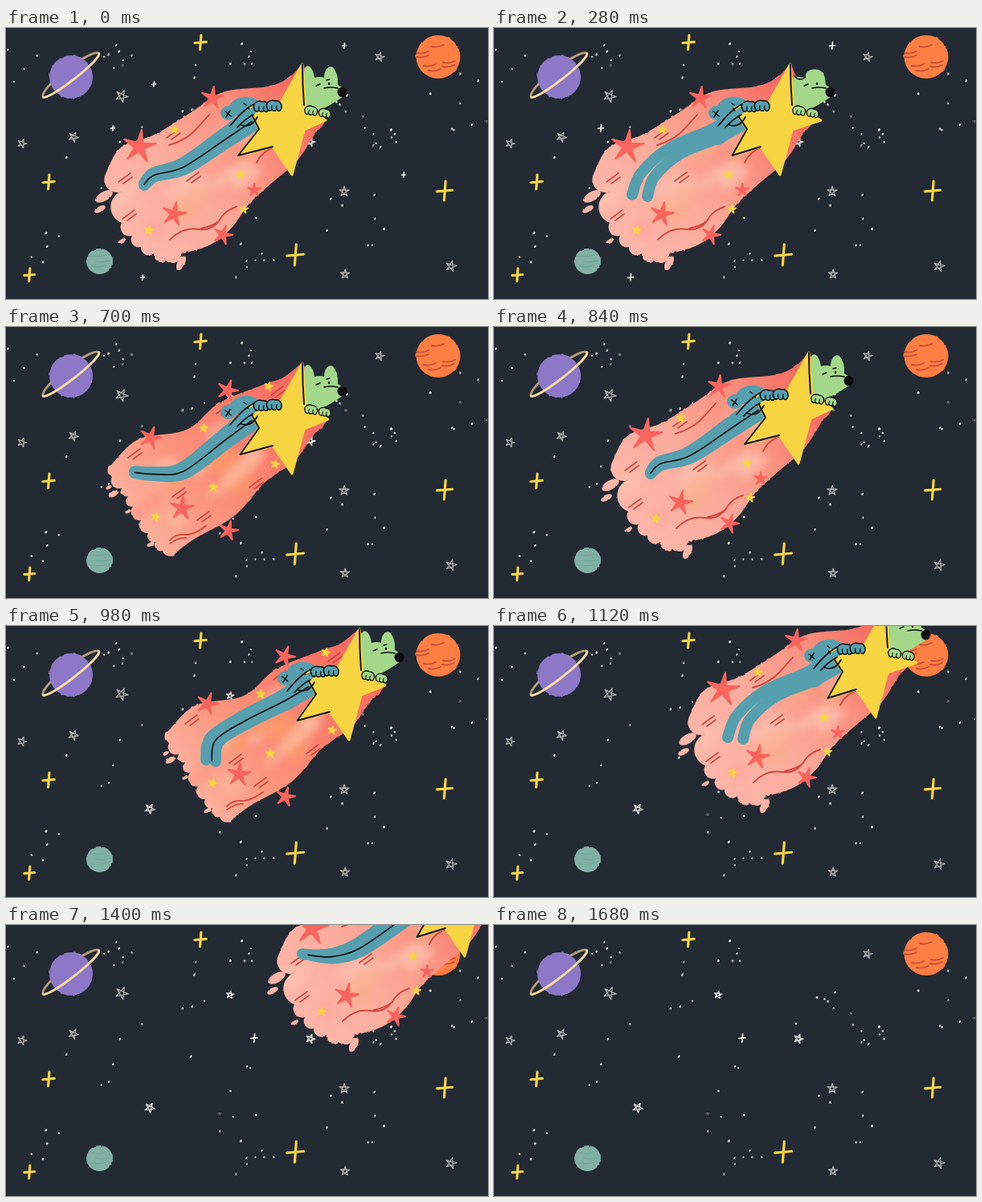
Animation, 600 px wide and 338 px high, one loop 1960 ms. Source, as an HTML page:

```html
<!DOCTYPE html>
<html lang="en">
<head>
<meta charset="utf-8">
<title>Star ride</title>
<style>
html, body { margin: 0; width: 100%; height: 100%; overflow: hidden; background: #232a33; }
svg { display: block; width: 100%; height: 100%; }
</style>
</head>
<body>
<svg id="stage" viewBox="0 0 600 338"></svg>
<script>
const BEAT = 140, LOOP = 1960, LAUNCH = 5, EMPTY = 12;
const INK = '#0d0d10', BLUE = '#569fae', GREEN = '#a3d88b', YELLOW = '#f6d442',
  CORAL = '#f9645e', DARK = '#d4473f', WHITE = '#f6f3ec', GRAY = '#b5b1ad';

const path = (d, attrs) => `<path d="${d}" ${attrs}/>`;
const line = (d, color = INK, width = 1.6) =>
  path(d, `fill="none" stroke="${color}" stroke-width="${width}" stroke-linecap="round" stroke-linejoin="round"`);
const ellipse = (x, y, rx, ry, fill, turn = 0, opacity = 1) =>
  `<ellipse cx="${x}" cy="${y}" rx="${rx}" ry="${ry}" fill="${fill}" opacity="${opacity}" transform="rotate(${turn} ${x} ${y})"/>`;
const rough = content => `<g filter="url(#rough)">${content}</g>`;
const points = text => text.split(' ').map(p => p.split(',').map(Number));
const each = (text, draw) => points(text).map(p => draw(...p)).join('');
const repeat = (n, draw) => Array.from({ length: n }, (_, i) => draw(i)).join('');
const wave = (pose, peak) => Math.cos((pose - peak) * Math.PI / 3);
const mix = (a, b, t) => a + (b - a) * t;

let seed = 11;
function random(low, high) {
  seed = (seed * 16807) % 2147483647;
  return mix(low, high, seed / 2147483647);
}

// Catmull-Rom spline, without its leading move
function curve(p) {
  const at = i => p[Math.max(0, Math.min(p.length - 1, i))];
  return p.slice(1).map((end, i) => {
    const from = at(i), before = at(i - 1), after = at(i + 2);
    const c1 = from.map((v, k) => v + (end[k] - before[k]) / 6);
    const c2 = end.map((v, k) => v - (after[k] - from[k]) / 6);
    return `C${c1} ${c2} ${end}`;
  }).join('');
}

function polar(x, y, r, degrees) {
  const a = degrees * Math.PI / 180;
  return [x + r * Math.sin(a), y - r * Math.cos(a)];
}
function solidStar(x, y, r, color) {
  const d = repeat(10, i => (i ? 'L' : 'M') + polar(x, y, i % 2 ? r * .28 : r, i * 36 + y % 20));
  return path(d + 'Z', `fill="${color}" stroke="${color}" stroke-width="2.2" stroke-linejoin="round"`);
}
const scribbleStar = (x, y, r, color) =>
  line(repeat(5, i => (i ? 'L' : 'M') + polar(x, y, r, i * 144 + x % 30)) + 'Z', color, 1.2);
const cross = (x, y, r, color, width) =>
  line(`M${x + r * .1},${y - r}L${x - r * .05},${y + r}M${x - r * .8},${y + r * .08}L${x + r * .8},${y - r * .06}`, color, width);
const dot = (x, y) => ellipse(x, y, random(.9, 1.4), random(.9, 1.8), WHITE, 25);

// Clusters: centre, spread and number of dots
const CLUSTERS = '142,38,20,8 290,35,16,6 464,130,22,10 400,105,30,6 300,290,34,9 55,272,24,5 ' +
  '270,180,60,7 430,248,42,8 565,95,38,8 20,45,24,4 225,75,30,5 120,165,55,6';

function sky() {
  const ring = (sweep, depth, color) =>
    `<g transform="rotate(-38 81 59)">${line(`M37,59A44,${depth} 0 0 ${sweep} 125,59`, color, 3)}</g>`;
  return each(CLUSTERS, (x, y, spread, n) =>
      repeat(n, () => dot(x + random(-spread, spread), y + random(-spread, spread)))) +
    each('144,85,8 20,144,6 84,136,6.5 465,36,6 421,204,6.5 422,307,6 554,297,7', (x, y, r) => scribbleStar(x, y, r, GRAY)) +
    each('279,87,5 379,142,6 179,228,6.5', (x, y, r) => scribbleStar(x, y, r, WHITE)) +
    cross(309, 141, 5, WHITE, 1.8) +
    each('242,18,9 53,192,9 29,308,8 360,283,13 546,203,12', (x, y, r) => cross(x, y, r, YELLOW, 3.2)) +
    ring(1, 9, '#b39c7c') +
    rough(ellipse(81, 61, 27, 27, '#8c78c6') + ellipse(538, 36, 27.5, 27, '#ff7e43') + ellipse(116.5, 291, 16.5, 16, '#82b0a4')) +
    each('511,31 511,36 530,23 520,47 544,43 543,48 526,53', (x, y) => line(`M${x},${y}q7,2 15,-2`, '#c4503a', 1.9)) +
    each('107,284 111,291 106,297', (x, y) => line(`M${x},${y}q10,2 19,-1`, '#6ea597', 1.2)) +
    ring(0, 6, '#f5d9a4');
}

// Smooth flanks joined by a tail of round lobes
function plume(upper, tail, lower) {
  const [a, t, b] = [upper, tail, lower].map(points);
  let last = a[a.length - 1];
  const lobes = t.map(p => {
    const r = Math.hypot(p[0] - last[0], p[1] - last[1]) * .54;
    last = p;
    return `A${r},${r} 0 0 0 ${p}`;
  }).join('');
  return `M${a[0]}${curve(a)}${lobes}${curve([last, ...b])}Z`;
}

function trail(id, { shape, drops, tints, waves, dashes, reds, yellows }) {
  const washes = repeat(16, i => {
    const t = random(0, 1), side = random(-32, 32);
    return ellipse(mix(160, 315, t) + side * .6, mix(235, 140, t) + side, random(12, 30), random(8, 16),
      tints[i % tints.length], -38, .5);
  });
  return `<g id="trail${id}"><clipPath id="clip${id}">${path(shape, '')}</clipPath>` +
    rough(path(shape, `fill="url(#heat${id})"`) + each(drops, (x, y, r, turn) => ellipse(x, y, r, r * .48, '#fbb5a8', turn))) +
    `<g clip-path="url(#clip${id})"><g filter="url(#soft)">${washes}</g></g>` +
    line(waves, DARK, 1.9) +
    each(dashes, (x, y) => line(`M${x},${y}l15,-11m-9,13l11,-8`, DARK, 1.7)) +
    each(reds, (x, y, r) => solidStar(x, y, r, CORAL)) +
    each(yellows, (x, y) => solidStar(x, y, 5, YELLOW)) + '</g>';
}

const TRAILS = [
  {
    shape: plume('369,44 352,62 325,73 270,80 229,106 185,133 143,149 124,182',
      '143,204 144,243 157,259 168,273 184,281 199,290 218,282',
      '255,270 282,248 302,220 330,194 362,166 384,133 397,112 380,70'),
    drops: '122,210,12,-30 117,226,7.5,-28 144,266,5,-30 218,293,10,115',
    tints: ['#fdc6b4', '#f9ae88', '#fca69e'],
    waves: 'M203,146Q224,140 236,127T253,108M204,264Q220,248 239,251T268,236Q276,226 287,223M243,250Q258,247 266,240M312,168Q320,150 345,146',
    dashes: '140,192 225,191 145,238 200,137',
    reds: '166,148,21 257,87,14 209,232,15 270,258,12 309,202,8',
    yellows: '210,127 292,183 296,226 178,252'
  },
  {
    shape: plume('369,44 345,63 320,72 265,95 225,128 165,140 131,172',
      '132,187 143,201 151,211 158,224 168,241 177,257 186,268 195,279 212,281',
      '235,264 285,235 322,194 358,168 382,136 398,116 380,70'),
    drops: '134,208,7,-30 128,200,4,-30 152,230,4,-30 180,271,5,-28',
    tints: ['#fdc3b4', '#fba066', '#fbbd9c', '#fb8f7c'],
    waves: 'M204,266Q211,258 222,259T249,248M204,270Q216,262 224,263',
    dashes: '152,163 207,212 262,108 330,85 303,200 238,241 345,162',
    reds: '180,138,14 276,79,13 219,226,15 277,254,12',
    yellows: '327,74 246,126 335,171 258,200 186,237'
  }
];

function greenHead(folded) {
  const ears = folded
    ? 'M370,96C369,80 370,67 374,60Q384,62 388,62C386,51 402,48 410,56Q413,63 413,71'
    : 'M371,96C368,82 370,62 372,50C375,44 382,48 384,62Q391,60 396,62C396,53 401,46 407,49Q414,57 413,71';
  return path(ears + 'L421,76Q424,84 416,88Q407,94 400,98L385,104Z', `fill="${GREEN}"`) +
    ellipse(418.5, 80, 6, 6.3, INK) + ellipse(402, 69.5, 1.2, 1.7, INK) +
    line('M386,72l5,-2M396,75Q404,73 413,75' + (folded ? 'M374,60Q380,67 387,62' : 'M399,65l4,-1'), INK, 1.4);
}

function yellowStar(pose) {
  const sway = wave(pose, 3);
  const tips = [[369, 45], [404 + 6 * sway, 115], [356, 183], [294 + 5 * sway, 159], [299 - 3 * sway, 100]];
  const inner = points('373,98 371,127 332,148 315,126 342,93');
  const d = 'M' + tips.map((p, i) => `${p}L${inner[i]}`).join('L') + 'Z';
  return path(d, `fill="${YELLOW}" stroke="${YELLOW}" stroke-width="3" stroke-linejoin="round"`) +
    line(`M${tips[0]}Q369,70 371,96M${tips[4]}L${inner[3]}L${tips[3]}L${inner[2]}`, INK, 1.9);
}

// The feet follow the knees by part of a kick
function legs(pose) {
  const spread = 20 * Math.sin(pose * Math.PI / 5), knee = wave(pose, 2);
  const spine = [[300, 110], [268, 132 - 4 * knee], [218, 163 - 13 * knee], [183, 181],
    [166 + 12 * wave(pose, 1), 194 + 16 * wave(pose, 1.5)]];
  const leg = side => {
    const p = spine.map(([x, y], i) => [x + side * mix(10, spread, i / 4), y + side * mix(11, 2, i / 4)]);
    return `M${p[0]}${curve(p)}`;
  };
  return [0, .5, 1].map(side => side === .5 && spread > 5 ? '' : line(leg(side), BLUE, 14)).join('') +
    line('M308,112L278,134', BLUE, 24) +
    (spread < 15 ? line(leg(.6), INK, 1.7) : '');
}

const paw = (x, y, color, turn, size = 1) => `<g transform="translate(${x} ${y}) rotate(${turn}) scale(${size})">` +
  path('M-9,3C-12,-5 -4,-8 1,-6C7,-7 11,-1 8,5Q6,8 3,5Q0,8 -3,5Q-7,8 -9,3Z',
    `fill="${color}" stroke="${INK}" stroke-width="1.5"`) + line('M-3,5Q-4,2 -3,0M3,5Q2,2 3,0', INK, 1.3) + '</g>';

const riders = pose => `<g id="pose${pose}">` + greenHead(pose === 2) +
  ellipse(277, 106, 10, 9, BLUE) + ellipse(297, 98, 19, 12, BLUE, -8) +
  legs(pose) + yellowStar(pose) +
  line('M297,111Q311,99 325,96', BLUE, 8) +
  line('M273,104l7,6M279,103l-5,8M296,94l3,2', INK, 1.5) +
  line('M279,122Q292,106 302,99T318,92M288,124Q298,113 308,108M293,121Q306,125 313,111', INK, 1.7) +
  paw(318, 98, BLUE, 0) + paw(334, 97, BLUE, 0) +
  paw(380, 103, GREEN, 8, .85) + paw(397, 106, GREEN, 8, .8) + '</g>';

const heat = (id, ...colors) => `<linearGradient id="heat${id}" gradientUnits="userSpaceOnUse" x1="150" y1="245" x2="385" y2="85">` +
  colors.map((c, i) => `<stop offset="${i / (colors.length - 1)}" stop-color="${c}"/>`).join('') + '</linearGradient>';

const stage = document.getElementById('stage');
stage.innerHTML = `<defs>
  ${heat(0, '#fcb5a8', '#fbab9b', '#f98d7d', '#f4645b')}
  ${heat(1, '#fcb4a2', '#fb947e', '#fa7c6b', '#f9685f')}
  <filter id="soft"><feGaussianBlur stdDeviation="5"/></filter>
  <filter id="rough" color-interpolation-filters="sRGB">
    <feTurbulence type="fractalNoise" baseFrequency=".12" numOctaves="2" seed="4"/>
    <feDisplacementMap in="SourceGraphic" scale="2.5" xChannelSelector="R" yChannelSelector="G"/></filter>
  </defs><rect width="600" height="338" fill="#232a33"/>${sky()}<g id="twinkles"></g>
  <g id="ride">${TRAILS.map((t, i) => trail(i, t)).join('')}${repeat(6, riders)}</g>`;

const find = id => document.getElementById(id);
const ride = find('ride'), twinkles = find('twinkles');
const trailNodes = TRAILS.map((_, i) => find('trail' + i));
const poseNodes = Array.from({ length: 6 }, (_, i) => find('pose' + i));
const show = (nodes, active) => nodes.forEach((n, i) => n.setAttribute('display', i === active ? 'inline' : 'none'));

// Steady climb, then a burst of speed
function flight(beat) {
  const n = beat - LAUNCH, burst = Math.max(0, n - 4);
  if (n <= 0) return [0, 0];
  return [48 * n - 25 + 42 * burst * (burst - 1), 15 - 28 * n - 19 * burst * burst];
}

function draw(beat) {
  const fading = '184,70,1 495,183,1 421,22,3 133,125,3 170,311,3';
  twinkles.innerHTML = each(fading, (x, y, last) => beat > last ? '' : cross(x, y, 3 + beat * .7, WHITE, 1.7));
  ride.setAttribute('display', beat < EMPTY ? 'inline' : 'none');
  ride.setAttribute('transform', `translate(${flight(beat)})`);
  show(trailNodes, beat % 2);
  show(poseNodes, beat % 6);
}

const start = performance.now();
let shown = -1;
function tick() {
  const beat = Math.min(EMPTY, Math.floor((performance.now() - start) % LOOP / BEAT));
  if (beat !== shown) draw(shown = beat);
  requestAnimationFrame(tick);
}
tick();
</script>
</body>
</html>
```
